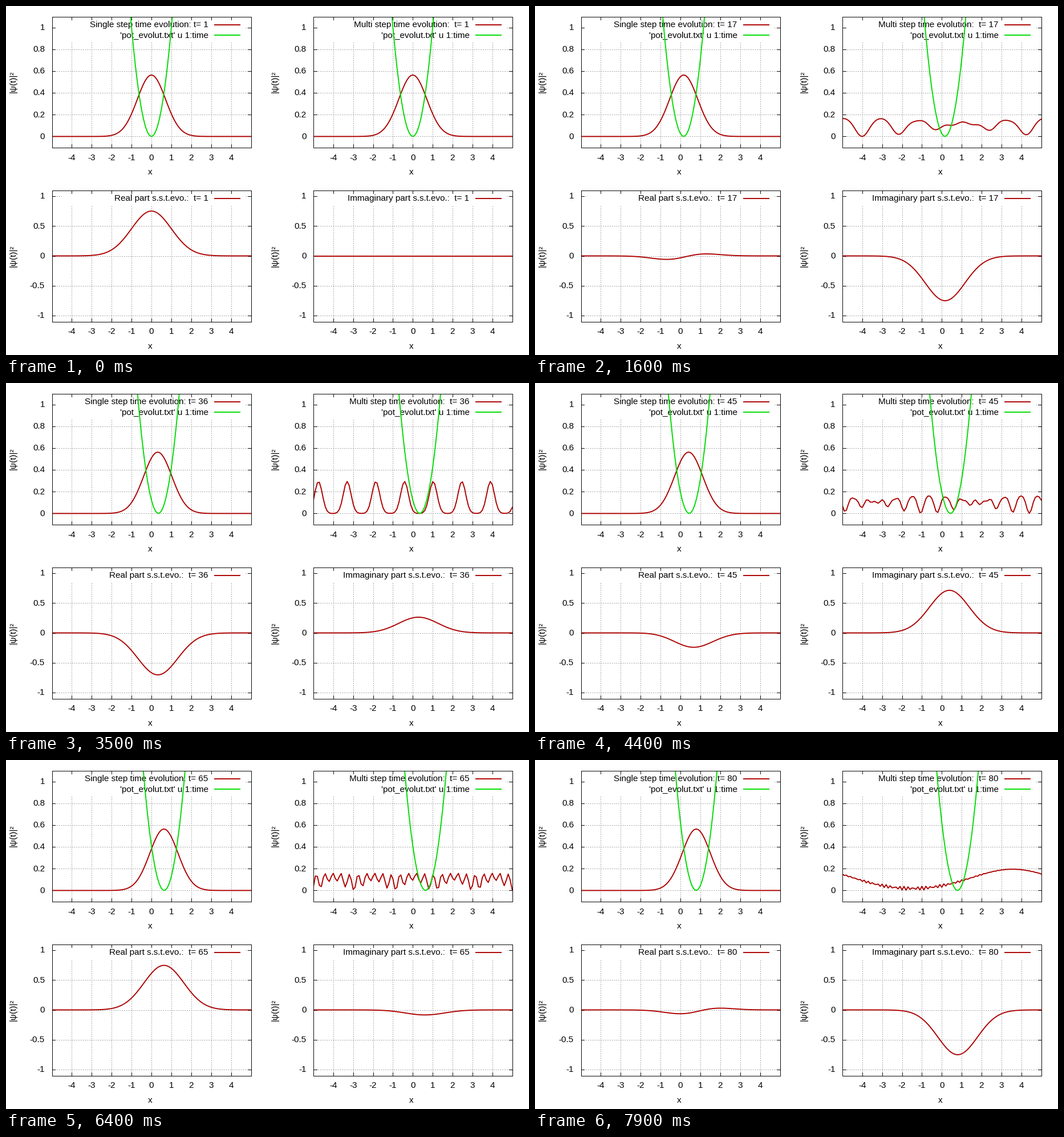
A matplotlib script for the animation above (8 s loop, 917 px wide and 611 px high).

```python
import numpy as np
import matplotlib.pyplot as plt
from matplotlib.animation import FuncAnimation
from matplotlib.patches import Rectangle

W, H, DPI = 917, 611, 128
PX = 72 / DPI  # points per pixel
FRAMES = 80
RED, GREEN, GRID = "#ad0000", "#00dc00", "#a0a0a0"

plt.rcParams["font.family"] = "Liberation Sans"
plt.rcParams["font.size"] = 15.3 * PX

# Periodic grid, H = p^2 + (x - q)^2, with the well drifting to the right
DX, DT = 0.1, 0.1
x = np.linspace(-5, 5, 101)
k = 2 * np.pi * np.fft.fftfreq(x.size, DX)
psi0 = np.pi ** -0.25 * np.exp(-x**2 / 2)


def well(n):
    return (x - 0.01 * (n - 1)) ** 2


def strang(psi, v, t):
    half = np.exp(-0.5j * v * t)
    return half * np.fft.ifft(np.exp(-1j * k**2 * t) * np.fft.fft(half * psi))


small_steps = [psi0.astype(complex)]
for n in range(1, FRAMES):
    small_steps.append(strang(small_steps[-1], well(n + 0.5), DT))
one_step = [strang(psi0, well(n), n * DT) for n in range(1, FRAMES + 1)]

fig = plt.figure(figsize=(W / DPI, H / DPI), dpi=DPI, facecolor="white")
ax = fig.add_axes([0, 0, 1, 1])
ax.set_xlim(0, W)
ax.set_ylim(H, 0)
ax.axis("off")


def line(xs, ys, color="black", width=0.95, z=1, **kw):
    return ax.plot(xs, ys, color=color, lw=width * PX, zorder=z, **kw)[0]


def label(px, py, s, ha="center", **kw):
    return ax.text(px, py, s, ha=ha, va="baseline", zorder=4, **kw)


class Panel:
    def __init__(self, x0, x1, y0, y1, ymax, ticks, title, with_well):
        self.box, self.ymin, self.ymax = (x0, x1, y0, y1), -1.1 if ymax > 1.1 else -0.1, 1.1
        self.title = title
        for v in range(-4, 5):
            px = self.px(v)
            self.grid([px, px], [y1, y0])
            line([px, px], [y0, y0 + 5.5], z=5)
            line([px, px], [y1, y1 - 5.5], z=5)
            label(px, y1 + 22, str(v))
        for v in ticks:
            py = self.py(v)
            self.grid([x0, x1], [py, py])
            line([x0, x0 + 5.5], [py, py], z=5)
            line([x1, x1 - 5.5], [py, py], z=5)
            label(x0 - 12.5, py + 4.3, f"{v:g}", "right")
        label((x0 + x1) / 2 - 2.7, y1 + 47.5, "x")
        label(x0 - 63.8, (y0 + y1) / 2, "|ψ(t)|²", rotation=90,
              rotation_mode="anchor")

        # The legend hides the grid behind it
        self.blank = Rectangle((x0, y0), x1 - 10 - x0, 44.5 if with_well else 26.5,
                               fc="white", ec="none", zorder=2)
        ax.add_patch(self.blank)
        self.text = label(x1 - 75, y0 + 19, "", "right")
        self.sample(y0 + 14.7, RED)
        self.curve = self.plot(RED, 6)
        self.well = None
        if with_well:
            label(x1 - 75, y0 + 37.2, "'pot_evolut.txt' u 1:time", "right")
            self.sample(y0 + 32.7, GREEN)
            self.well = self.plot(GREEN, 7)
        line([x0, x1, x1, x0, x0], [y0, y0, y1, y1, y0], z=8)

    def px(self, v):
        x0, x1 = self.box[:2]
        return x0 + (v + 5) * (x1 - x0) / 10

    def py(self, v):
        y0, y1 = self.box[2:]
        return y1 - (v - self.ymin) * (y1 - y0) / (self.ymax - self.ymin)

    def grid(self, xs, ys):
        line(xs, ys, GRID, dashes=(2, 2), dash_capstyle="butt")

    def sample(self, py, color):
        x1 = self.box[1]
        line([x1 - 65, x1 - 18.5], [py, py], color, 1.9, 4, solid_capstyle="butt")

    def plot(self, color, z):
        x0, x1, y0, y1 = self.box
        ln = line([], [], color, 1.9, z, solid_joinstyle="round")
        ln.set_clip_path(Rectangle((x0, y0), x1 - x0, y1 - y0,
                                   transform=ax.transData))
        return ln

    def update(self, n, values):
        self.text.set_text(f"{self.title}t= {n}")
        self.curve.set_data(self.px(x), self.py(values))
        if self.well:
            self.well.set_data(self.px(x), self.py(well(n)))


LEFT, RIGHT = (80.5, 429.5), (539, 887.5)
TOP, BOTTOM = (18.5, 247.5), (322.5, 552.5)
density = (1.1, [0, 0.2, 0.4, 0.6, 0.8, 1])
signed = (2.2, [-1, -0.5, 0, 0.5, 1])

single = Panel(*LEFT, *TOP, *density, "Single step time evolution: ", True)
multi = Panel(*RIGHT, *TOP, *density, "Multi step time evolution:  ", True)
real = Panel(*LEFT, *BOTTOM, *signed, "Real part s.s.t.evo.:  ", False)
imag = Panel(*RIGHT, *BOTTOM, *signed, "Immaginary part s.s.t.evo.:  ", False)


def update(i):
    n = i + 1
    psi = small_steps[i]
    single.update(n, abs(psi) ** 2)
    multi.update(n, abs(one_step[i]) ** 2)
    real.update(n, psi.real)
    imag.update(n, psi.imag)
    left = 98 if n < 10 else 89.5
    real.blank.set_x(left)
    real.blank.set_width(LEFT[1] - 10 - left)
    return []


anim = FuncAnimation(fig, update, frames=FRAMES, interval=100,
                     init_func=lambda: [], repeat=True)
plt.show()
```
